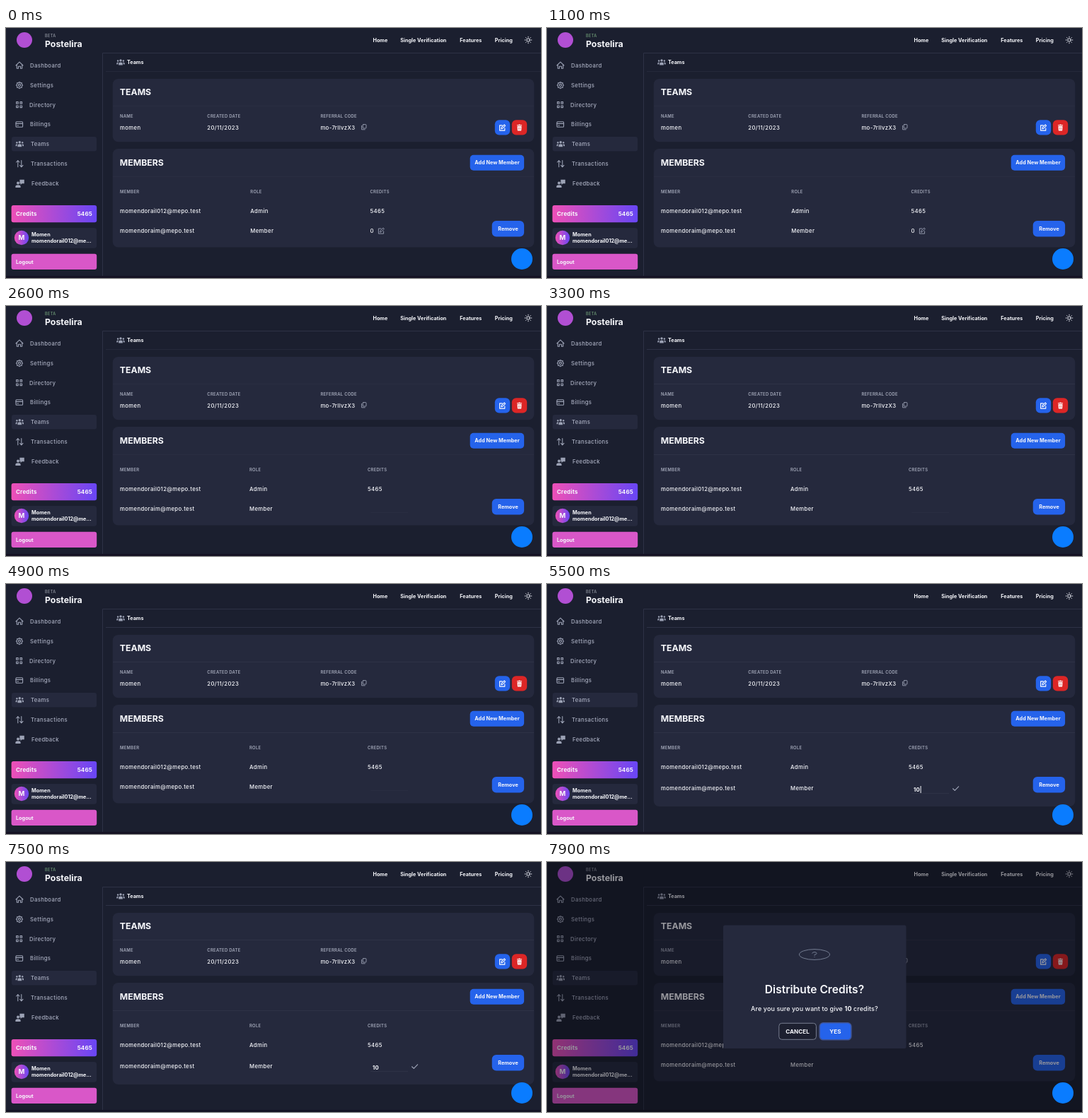
An HTML page that plays this animation: 756x354 px, repeating every 8 s.

```html
<!DOCTYPE html>
<html lang="en">
<head>
<meta charset="utf-8">
<title>Teams</title>
<style>
html, body { margin: 0; width: 100%; height: 100%; overflow: hidden; background: #1b1f2f; }
svg { display: block; width: 756px; height: 354px; font-family: Inter, Roboto, sans-serif; }
text { fill: #f7f8fc; white-space: pre; }
.side { font-size: 7.75px; font-weight: 500; letter-spacing: .35px; fill: #a9aec0; }
.cell { font-size: 7.75px; font-weight: 500; letter-spacing: .35px; }
.label { font-size: 5.9px; font-weight: 600; letter-spacing: .28px; fill: #a4a9ba; }
.head { font-size: 12.3px; font-weight: 700; }
.bold { font-size: 7.25px; font-weight: 700; }
.sum { font-size: 8px; font-weight: 700; letter-spacing: .2px; }
.beta { font-size: 5.5px; font-weight: 600; letter-spacing: .4px; fill: #858a96; }
.mid { text-anchor: middle; }
.title { font-size: 15.6px; font-weight: 600; }
.ask { font-size: 9px; font-weight: 500; letter-spacing: .08px; }
.act { font-size: 8.1px; font-weight: 700; }
.ico { fill: none; stroke: #9ca2b5; stroke-width: 1.1; stroke-linecap: round; stroke-linejoin: round; }
.solid { fill: #9ca2b5; }
.rule { fill: none; stroke: #2e3246; stroke-width: 1; }
.panel { fill: #25293d; }
.blue { fill: #2563eb; }
</style>
</head>
<body>
<svg viewBox="0 0 756 354" xmlns="http://www.w3.org/2000/svg">
  <defs>
    <linearGradient id="pink"><stop offset="0" stop-color="#ee50b7"/><stop offset="1" stop-color="#6846f5"/></linearGradient>
    <g id="people">
      <circle cx="0" cy="-2.6" r="1.7"/><circle cx="-3.9" cy="-2" r="1.2"/><circle cx="3.9" cy="-2" r="1.2"/>
      <path d="M-2.8 4V2.2Q-2.8 0 0 0T2.8 2.2V4ZM-5.7 3V1.5Q-5.7-.2-3.2 0-3.9 1-3.8 3ZM5.7 3V1.5Q5.7-.2 3.2 0 3.9 1 3.8 3Z"/>
    </g>
    <path id="pen" d="M0-3.4H-3.6V3.8H3.6V.4M-1.4 1.5-.9-.6 3-4.4 4.4-3 .6.9Z"/>
  </defs>

  <rect width="756" height="354" fill="#1b1f2f"/>
  <rect y="351" width="756" height="3" fill="#151223"/>
  <path class="rule" d="M136.5 351V35.5H756"/>
  <path class="rule soft" d="M141 61.5H756"/>

  <circle cx="26" cy="17" r="11" fill="#b14fd3"/>
  <text id="beta" class="beta" x="55" y="13">BETA</text>
  <text class="head" x="55" y="27">Postelira</text>
  <g id="nav"></g>
  <g class="ico" style="stroke:#e8eaf2;stroke-width:1" transform="translate(738 17)">
    <circle r="2.2"/><path id="rays"/>
  </g>

  <rect class="panel" x="8" y="154" width="120" height="20.5" rx="3"/>
  <g id="menu"></g>
  <g class="ico">
    <path d="M14 53 19 48.2 24 53M15.3 52.2V57.3H17.5V54.2H20.5V57.3H22.7V52.2"/>
    <circle cx="19" cy="81" r="1.6"/>
    <circle cx="19" cy="81" r="3.9"/>
    <path id="teeth" transform="translate(19 81)"/>
    <path d="M14.6 104.6H17.2V107.2H14.6ZM20 104.6H22.6V107.2H20ZM14.6 110H17.2V112.6H14.6ZM20 110H22.6V112.6H20Z"/>
    <rect x="14" y="132.8" width="9.6" height="7.4" rx="1"/><path d="M14 135.4H23.6M15.8 138H17.6"/>
    <path d="M16.8 196.8V187.8M14.6 190 16.8 187.6 19 190M21.8 187.6V196.6M19.6 194.4 21.8 196.8 24 194.4"/>
  </g>
  <use href="#people" class="solid" x="19.3" y="164.3"/>
  <g class="solid">
    <circle cx="17" cy="219.5" r="2"/><path d="M13.4 226V224.4Q13.4 222.2 17 222.2T20.6 224.4V226Z"/>
    <path d="M19.4 214.8H25.8V220.3H22.6L20.6 222V220.3H19.4Z"/>
  </g>

  <rect x="7.6" y="251" width="120.6" height="24.2" rx="3" fill="url(#pink)"/>
  <text class="sum" x="14" y="266">Credits</text>
  <text class="sum" x="122" y="266" text-anchor="end">5465</text>
  <rect class="panel" x="7.6" y="283" width="120.6" height="28.8" rx="4"/>
  <circle cx="22" cy="297" r="10.2" fill="url(#pink)"/>
  <text class="mid" x="22" y="300.4" font-size="9.5" font-weight="700">M</text>
  <text class="bold" x="36" y="294.6">Momen</text>
  <text class="bold" x="36" y="304.2">momendorail012@me...</text>
  <rect x="7.6" y="319.8" width="120.6" height="22.2" rx="3" fill="#d957c8"/>
  <text class="bold" x="14" y="333.6">Logout</text>

  <use href="#people" class="solid" x="162" y="48.5"/>
  <text class="bold" x="171" y="50.6">Teams</text>

  <rect class="panel" x="150.7" y="72" width="595.6" height="89.3" rx="8"/>
  <path class="rule soft" d="M151 110.5H746"/>
  <text class="head" x="160.8" y="95.4">TEAMS</text>
  <text class="label" x="161" y="127">NAME</text>
  <text class="label" x="284.3" y="127">CREATED DATE</text>
  <text class="label" x="444.4" y="127">REFERRAL CODE</text>
  <text class="cell" x="161" y="144">momen</text>
  <text class="cell" x="284.3" y="144">20/11/2023</text>
  <text class="cell" x="444.4" y="144">mo-7rIlvzX3</text>
  <g class="ico" style="stroke-width:.9"><rect x="504.2" y="136.6" width="4.8" height="5.4" rx=".8"/><path d="M502.6 138.4V143.8H507.2"/></g>
  <rect class="blue" x="690.8" y="130.3" width="21.4" height="21.2" rx="6"/>
  <use href="#pen" class="ico" style="stroke:#fff" x="701.2" y="141.3"/>
  <rect x="714.8" y="130.3" width="21.4" height="21.2" rx="6" fill="#dc2626"/>
  <path d="M722 137.2H724.3L724.8 136.4H726.2L726.7 137.2H729V138.3H722ZM722.5 139H728.5L728.1 145.4H722.9Z" fill="#fff"/>
  <path d="M724.5 140.5V144M726.5 140.5V144" stroke="#dc2626" stroke-width=".6"/>

  <rect id="members" class="panel" x="150.7" y="171" width="595.6" height="139.5" rx="8"/>
  <path class="rule soft" d="M151 210.5H746"/>
  <text class="head" x="160.8" y="194.8">MEMBERS</text>
  <rect class="blue" x="655.7" y="179.8" width="76.4" height="21.9" rx="5"/>
  <text class="bold mid" x="694" y="193.4">Add New Member</text>
  <text class="label" x="161" y="234">MEMBER</text>
  <text class="label role" y="234">ROLE</text>
  <text class="label cred" y="234">CREDITS</text>
  <text class="cell" x="161" y="261.8">momendorail012@mepo.test</text>
  <text class="cell role" y="261.8">Admin</text>
  <text class="cell cred" y="261.8">5465</text>
  <g id="row">
    <text class="cell" x="161" y="289.8">momendoraim@mepo.test</text>
    <text class="cell role" y="289.8">Member</text>
  </g>
  <g id="view">
    <text class="cell" x="514.5" y="289.8">0</text>
    <use href="#pen" class="ico" style="stroke-width:.9" x="530" y="287.4"/>
  </g>
  <path id="line" class="rule"/>
  <g id="typed">
    <text class="cell" style="font-weight:700;letter-spacing:.2px" x="518" y="294.2">10</text>
    <path class="ico" d="M573.6 289.8 576.3 292.4 581.6 286.8" style="stroke-width:1.2"/>
  </g>
  <rect id="caret" width="1" height="10" fill="#f7f8fc"/>
  <rect class="blue" x="686.7" y="273" width="45.4" height="22.6" rx="6"/>
  <text class="bold mid" x="709.5" y="286.8">Remove</text>

  <g id="modal">
    <rect width="756" height="354" fill="#05070e" opacity=".4"/>
    <rect x="249" y="89.5" width="258.5" height="174.5" rx="2.5" fill="#25293d"/>
    <g fill="none" stroke="#747d92" stroke-width="1">
      <ellipse cx="378" cy="131" rx="21.5" ry="7.4"/>
      <path d="M374.6 129.6Q375 127.6 378 127.6T381.2 129.5Q381.2 130.6 378 131.4V132.6M378 134.2V135"/>
    </g>
    <text class="title mid" x="378" y="186.4">Distribute Credits?</text>
    <text class="ask mid" x="378" y="210.8">Are you sure you want to give <tspan font-weight="700">10</tspan> credits?</text>
    <rect x="327.8" y="228.3" width="52.6" height="23" rx="4" fill="#1d2030" stroke="#777d90"/>
    <text class="act mid" x="354" y="242.8">CANCEL</text>
    <rect x="385.3" y="227.8" width="44.6" height="24" rx="5" class="blue" stroke="#3f5598" stroke-width="1.6"/>
    <text class="act mid" x="407.4" y="242.8">YES</text>
  </g>
  <circle cx="729" cy="327" r="15" fill="#0a7cff"/>
</svg>
<script>
const $ = id => document.getElementById(id);
const all = s => document.querySelectorAll(s);
const show = (id, on) => $(id).style.display = on ? "" : "none";
const within = (t, a, b) => t >= a && t < b;
const label = (cls, x, y, s) => `<text class="${cls}" x="${x}" y="${y}">${s}</text>`;

const nav = [["Home", 518.5], ["Single Verification", 557.3], ["Features", 641.3], ["Pricing", 690.8]];
$("nav").innerHTML = nav.map(([s, x]) => label("bold", x, 19.6, s)).join("");

const menu = [["Dashboard", 34], ["Settings", 34], ["Directory", 33], ["Billings", 34],
  ["Teams", 35], ["Transactions", 35], ["Feedback", 36]];
$("menu").innerHTML = menu.map(([s, x], i) => label("side", x, 56 + i * 27.8, s)).join("");

// Eight short radial strokes between two radii.
function spokes(a, b) {
  let d = "";
  for (let i = 0; i < 8; i++) {
    const c = Math.cos(i * Math.PI / 4), s = Math.sin(i * Math.PI / 4);
    d += `M${c * a} ${s * a}L${c * b} ${s * b}`;
  }
  return d;
}
$("rays").setAttribute("d", spokes(3.9, 4.8));
$("teeth").setAttribute("d", spokes(4.2, 4.7));

function draw(t) {
  const editing = t >= 2600;
  const typed = within(t, 5500, 7900);
  const asking = t >= 7900;

  all(".role").forEach(e => e.setAttribute("x", editing ? 344 : 345.3));
  all(".cred").forEach(e => e.setAttribute("x", editing ? 511 : 514.5));
  all(".soft").forEach(e => e.style.opacity = t < 3000 ? .55 : 1);
  $("members").setAttribute("height", typed ? 144 : 139.5);
  $("row").setAttribute("transform", `translate(0 ${typed ? 2.3 : 0})`);

  show("view", !editing);
  show("line", editing && !asking);
  $("line").setAttribute("d", typed ? "M515 296.5H568" : "M515 292.5H568");
  $("line").style.opacity = typed ? 1 : .5;
  show("typed", typed);

  show("caret", within(t, 4400, 4900) || within(t, 5500, 6400) || within(t, 6900, 7400));
  $("caret").setAttribute("x", typed ? 527.6 : 518.6);
  $("caret").setAttribute("y", typed ? 286 : 282);

  const green = within(t, 400, 4200) || within(t, 7200, 7900);
  $("beta").style.fill = green ? "#66906f" : "#858a96";
  show("modal", asking);
}

function tick(now) {
  draw(now % 8000);
  requestAnimationFrame(tick);
}
draw(0);
requestAnimationFrame(tick);
</script>
</body>
</html>
```
